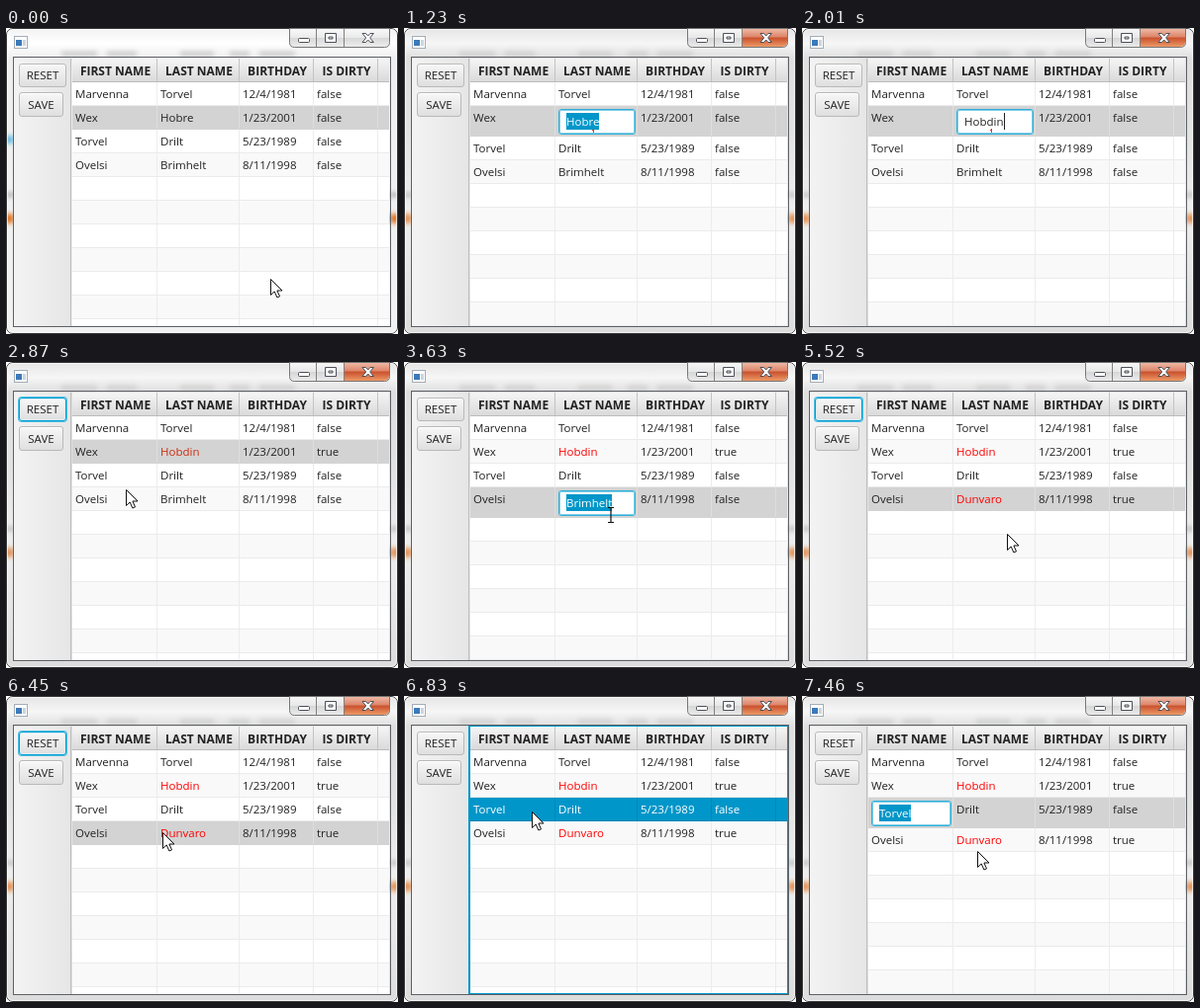
Animation of 396 by 310 pixels, one loop 8 s. Source, as an HTML page:

```html
<!DOCTYPE html>
<html lang="en">
<head>
<meta charset="utf-8">
<title>Editable table</title>
<style>
  html, body { margin: 0; width: 100%; height: 100%; overflow: hidden; background: #fff; }
  #stage { position: relative; width: 396px; height: 310px; overflow: hidden;
    font: 11.5px "Open Sans", "Noto Sans", sans-serif; color: #222; white-space: pre; cursor: default; }
  #stage * { box-sizing: border-box; }
  #stage > *, .btn, .cell, .field { position: absolute; }
  svg { left: 0; top: 0; overflow: visible; }

  .idle-only, .idle .active-only { display: none; }
  .idle .idle-only { display: inline; }
  #blobs { opacity: .75; }
  .idle #blobs { opacity: 1; }

  #bar { left: 8px; top: 31px; width: 58px; height: 271px;
    background: linear-gradient(90deg, #f3f3f3, #e6e6e6); border-right: 1px solid #bdbdbd; }
  .btn { left: 13px; height: 24px; line-height: 22px; text-align: center; border: 1px solid #b9b9b9;
    border-radius: 3px; background: linear-gradient(#f7f7f7, #dfdfdf); box-shadow: inset 0 1px #fff; }
  .btn.focus { border-color: #039ed3; box-shadow: 0 0 0 1px #4fbfe2, inset 0 0 0 1px #dcecf2; }
  #reset { top: 36px; width: 48px; }
  #save { top: 65px; width: 45px; height: 25px; line-height: 23px; }

  #table { left: 67px; top: 31px; width: 320px; height: 271px; overflow: hidden; background: #fff; }
  #head { height: 24px; background: linear-gradient(#f5f5f5, #dadada); border-bottom: 1px solid #bcbcbc; }
  #head .cell { height: 23px; padding: 0 0 0 2px; text-align: center; border-color: #c3c3c3;
    font-size: 12px; font-weight: 700; line-height: 25px; }
  .row { position: relative; height: 24px; border-bottom: 1px solid #ebebeb; }
  .row:nth-child(even) { background: #f9f9f9; }
  .cell { top: 0; height: 100%; padding-left: 3px; line-height: 23px; border-right: 1px solid #ececec; }
  .row.open { height: 31px; }
  .row.grey { background: #d3d3d3; border-color: #d3d3d3; }
  .row.grey .cell { border-color: #dedede; }
  .row.blue { background: #0096c9; border-color: #0086b4; color: #fff; }
  .row.blue .cell { border-color: #0087b5; }
  .dirty { color: #f00; }
  .grey .dirty.dim { color: #cd2d0f; }

  .field { left: 3px; top: 3px; right: 1px; height: 26px; padding-left: 7px; line-height: 21px;
    background: #fff; border: 1px solid #2fb0da; border-radius: 3px; box-shadow: inset 0 0 0 1px #7fcde6; }
  .field span { display: inline-block; height: 17px; margin-top: 3px; line-height: 17px; vertical-align: top; }
  .field .picked { background: #0096c9; color: #fff; }
  .field .caret { width: 1px; margin-right: -1px; background: #222; }

  #ring { left: 65px; top: 30px; width: 323px; height: 272px; border: 1px solid #0096c9; border-left-width: 2px; }
  #frame { left: 7px; top: 29px; width: 382px; height: 274px; border: 1px solid #5d6064; }
  #cursor { left: 0; top: 0; }
</style>
</head>
<body>
<div id="stage" class="idle">
  <svg width="396" height="310" viewBox="0 0 396 310">
    <defs>
      <linearGradient id="glass" x2="0" y2="1">
        <stop offset="0" stop-color="#e4e4e4"/><stop offset=".05" stop-color="#f6f6f6"/>
        <stop offset=".1" stop-color="#dedede"/><stop offset=".35" stop-color="#e2e2e2"/>
        <stop offset=".6" stop-color="#eee"/><stop offset="1" stop-color="#dcdcdc"/>
      </linearGradient>
      <linearGradient id="pale" x2="0" y2="1">
        <stop offset="0" stop-color="#f2f2f2"/><stop offset=".05" stop-color="#fff"/>
        <stop offset=".1" stop-color="#eee"/><stop offset="1" stop-color="#f1f1f1"/>
      </linearGradient>
      <linearGradient id="plain" x2="0" y2="1">
        <stop offset="0" stop-color="#fbfbfb"/><stop offset=".48" stop-color="#e6e6e6"/>
        <stop offset=".5" stop-color="#cfcfcf"/><stop offset="1" stop-color="#e9e9e9"/>
      </linearGradient>
      <linearGradient id="red" x2="0" y2="1">
        <stop offset="0" stop-color="#efb8a4"/><stop offset=".45" stop-color="#dc8468"/>
        <stop offset=".5" stop-color="#c9502c"/><stop offset="1" stop-color="#ec9a68"/>
      </linearGradient>
      <filter id="blur" x="-50%" y="-100%" width="200%" height="300%"><feGaussianBlur stdDeviation="2.5"/></filter>
      <clipPath id="shape"><rect x="1" y="1" width="394" height="308" rx="6"/></clipPath>
    </defs>
    <g clip-path="url(#shape)">
      <rect class="active-only" width="396" height="310" fill="url(#glass)"/>
      <rect class="idle-only" width="396" height="310" fill="url(#pale)"/>
      <g id="blobs" filter="url(#blur)">
        <path d="M56 26h36M102 26h30M176 26h34M226 26h20M256 26h36" stroke="#c2c2c2" stroke-width="4"/>
        <path d="M0 169h8M388 169h8" stroke="#a0a0a0" stroke-width="4"/>
        <path d="M-4 193h12M388 193h12" stroke="#e0701c" stroke-width="9"/>
        <path class="idle-only" d="M-4 113h12" stroke="#5cb8e0" stroke-width="7"/>
      </g>
    </g>
    <rect x=".5" y=".5" width="395" height="309" rx="6.5" fill="none" stroke="#3c3c3c"/>
    <rect x="1.5" y="1.5" width="393" height="307" rx="5.5" fill="none" stroke="#fff" stroke-opacity=".75"/>
    <g>
      <rect x="8.5" y="8.5" width="13" height="12" fill="#fff" stroke="#a4adb6"/>
      <rect x="10" y="12" width="6" height="6" fill="#3b7abb"/>
      <rect x="17" y="12" width="3" height="6" fill="#cbd6e0"/>
    </g>
    <path d="M286.500 .5h101v14q0 5-5 5h-91q-5 0-5-5z" fill="url(#plain)" fill-opacity=".8" stroke="#777"/>
    <path class="active-only" d="M342 1h45v13q0 5-5 5h-40z" fill="url(#red)"/>
    <path d="M313.500 1v18M341.500 1v18" stroke="#808080"/>
    <g fill="#fff" stroke="#4c5058">
      <rect x="295.500" y="10.500" width="11" height="4" rx="1"/>
      <path d="M322.500 5.500h11v9h-11zM326 9v2h4v-2z" fill-rule="evenodd"/>
      <path d="M360 5.500h3.500l2.200 2.500 2.200-2.500h3.500l-3.700 4.500 3.700 4.500h-3.500l-2.200-2.500-2.200 2.500H360l3.700-4.500z"/>
    </g>
  </svg>
  <div id="bar"></div>
  <div class="btn" id="reset">RESET</div>
  <div class="btn" id="save">SAVE</div>
  <div id="frame"></div>
  <div id="table"><div id="head"></div><div id="rows"></div></div>
  <div id="ring"></div>
  <svg id="cursor" width="1" height="1">
    <path id="arrow" d="M.5 .5v16l3.700-3.500 2.700 6 2.600-1.100-2.600-5.900h5.100z" fill="#fff" stroke="#111"/>
    <path id="beam" d="M-3 -7.500h2.500l.5 .5 .5-.5H3M0-7V7M-3 7.500h2.500l.5-.5 .5 .5H3" fill="none" stroke="#111" stroke-width="1.200"/>
    <path id="tip" d="M.5 5v4M-1 6.500h2" fill="none" stroke="#e8341c"/>
  </svg>
</div>
<script>
const LOOP = 8000;
const $ = id => document.getElementById(id);

const columns = [
  ['FIRST NAME', 0, 86], ['LAST NAME', 86, 83], ['BIRTHDAY', 169, 75],
  ['IS DIRTY', 244, 65], ['', 309, 12]
];
const people = [
  ['Marvenna', 'Torvel', '12/4/1981'],
  ['Wex', 'Hobre', '1/23/2001'],
  ['Torvel', 'Drilt', '5/23/1989'],
  ['Ovelsi', 'Brimhelt', '8/11/1998']
];
// click: row focused, open: field shown, pick: text selected, blink: caret goes off
const edits = [
  { row: 1, col: 1, click: 453, open: 530, pick: 680, blink: 1230, caretEnd: true,
    text: 'Hobdin', keys: [1460, 1540, 1620, 1770, 1840, 2010], done: 2090 },
  { row: 3, col: 1, click: 3400, open: 3630, pick: 3630, blink: 4110,
    text: 'Dunvaro', keys: [4490, 4820, 4870, 5040, 5110, 5280, 5350], done: 5520 },
  { row: 2, col: 0, click: 6830, open: 6990, pick: 6990, blink: 7460,
    text: '', keys: [], done: Infinity }
];
// from, to, steps, x, y, shape
const moves = [
  [0, 0, 1, 267, 254, 'arrow'],
  [70, 377, 5, 190, 97, 'arrow'],
  [530, 530, 1, 191, 97, 'tip'],
  [2090, 2090, 1, 190, 97, 'arrow'],
  [2640, 2870, 4, 121, 129, 'arrow'],
  [2950, 3250, 5, 209, 148, 'arrow'],
  [3630, 3630, 1, 209, 155, 'beam'],
  [3710, 3710, 1, 207, 174, 'arrow'],
  [6140, 6680, 8, 129, 117, 'arrow'],
  [6990, 7140, 3, 177, 157, 'arrow']
];

const cell = (i, html, cls = '') =>
  `<div class="cell ${cls}" style="left:${columns[i][1]}px;width:${columns[i][2]}px">${html}</div>`;

function field(edit, name, t) {
  const typed = edit.keys.filter(k => k <= t).length;
  const caret = typed || t < edit.blink ? '<span class="caret"></span>' : '';
  const text = typed ? edit.text.slice(0, typed) : name;
  const picked = !typed && t >= edit.pick ? 'picked' : '';
  const label = `<span class="${picked}">${text}</span>`;
  return `<div class="field">${typed || edit.caretEnd ? label + caret : caret + label}</div>`;
}

function rowHtml(r, t, edit) {
  const selected = edit ? edit.row === r : r === 1;
  const open = edit && selected && t >= edit.open && t < edit.done;
  const blue = edit && selected && t < edit.open;
  const saved = edits.find(e => e.row === r && t >= e.done);
  const person = people[r];
  let html = '';
  columns.forEach((_, i) => {
    if (!person) html += cell(i, '');
    else if (open && i === edit.col) html += cell(i, field(edit, person[i], t));
    else if (saved && i === saved.col) html += cell(i, saved.text, r === 1 ? 'dirty dim' : 'dirty');
    else html += cell(i, i === 3 ? String(!!saved) : person[i] || '');
  });
  const tone = blue ? 'blue' : selected ? 'grey' : '';
  return `<div class="row ${tone} ${open ? 'open' : ''}">${html}</div>`;
}

function placeCursor(t) {
  const n = moves.filter(m => m[0] <= t).length - 1;
  const [from, to, steps, x, y, shape] = moves[n];
  const [, , , px, py] = moves[Math.max(n - 1, 0)];
  const k = t >= to ? 1 : (Math.floor((t - from) / (to - from) * (steps - 1)) + 1) / steps;
  const at = (a, b) => Math.round(a + (b - a) * k);
  $('cursor').style.transform = `translate(${at(px, x)}px,${at(py, y)}px)`;
  for (const id of ['arrow', 'beam', 'tip']) $(id).style.display = id === shape ? '' : 'none';
}

let shown = '';
function draw(t) {
  const edit = edits.filter(e => e.click <= t).pop();
  let html = '';
  for (let r = 0; r < 11; r++) html += rowHtml(r, t, edit);
  if (html !== shown) $('rows').innerHTML = shown = html;
  $('stage').classList.toggle('idle', !edit);
  $('reset').classList.toggle('focus', !!edit && t >= edit.done);
  $('ring').style.display = edit && t < edit.open ? '' : 'none';
  placeCursor(t);
}

$('head').innerHTML = columns.map((c, i) => cell(i, c[0])).join('');
const start = performance.now();
function tick() {
  draw((performance.now() - start) % LOOP);
  requestAnimationFrame(tick);
}
tick();
</script>
</body>
</html>
```
